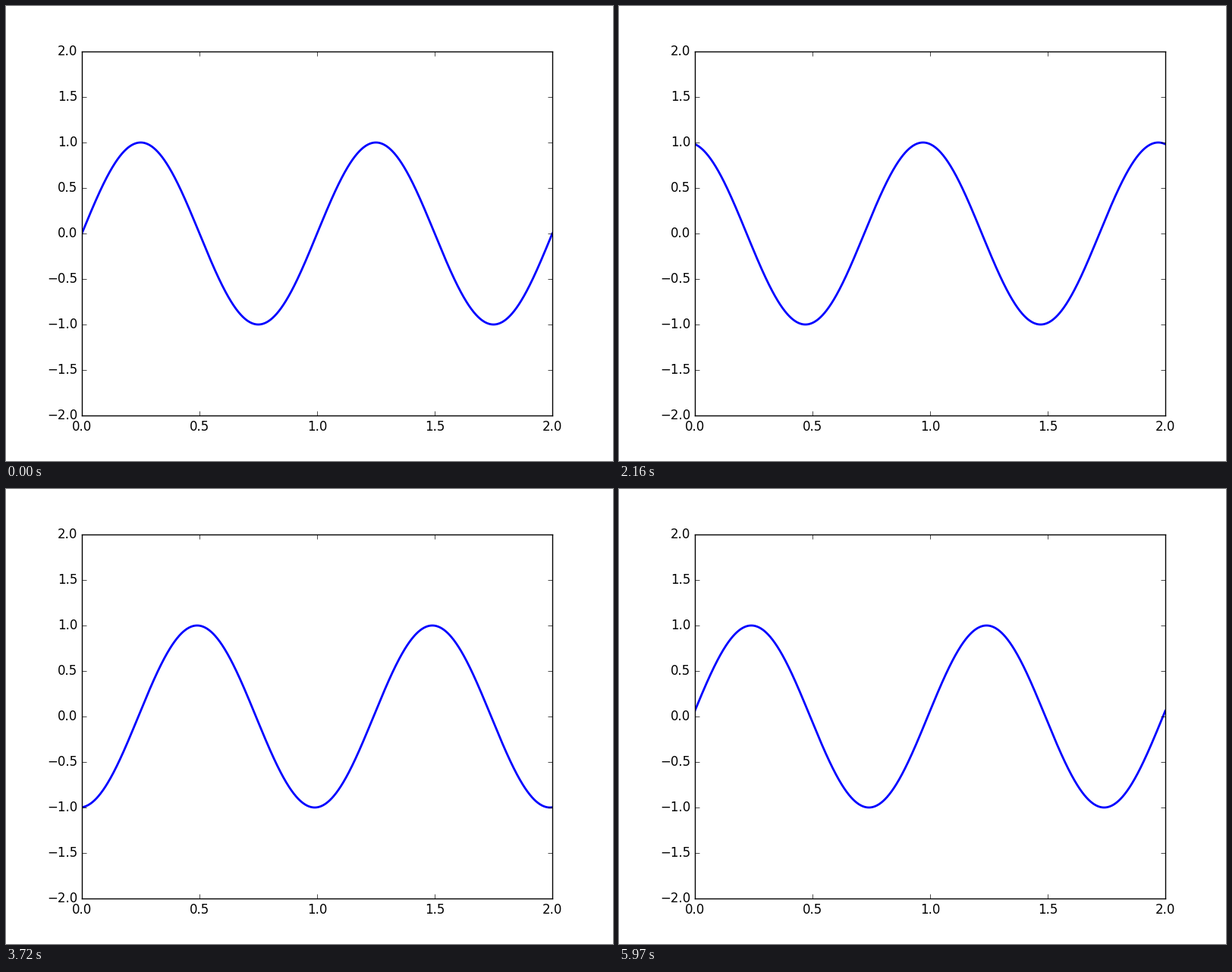
These frames come from a looping animation (800x600 px, 6000 ms). A matplotlib script:

```python
import matplotlib.pyplot as plt
import numpy as np
from matplotlib.animation import FuncAnimation

FRAMES = 200
INTERVAL = 30  # ms
SHIFT = 0.01   # wave travel per frame, in x units

plt.style.use("classic")
plt.rcParams["font.family"] = "DejaVu Sans"

fig = plt.figure(figsize=(8, 6), dpi=100, facecolor="white")
ax = fig.add_axes([0.125, 0.1, 0.775, 0.8], xlim=(0, 2), ylim=(-2, 2))
ax.set_xticks(np.arange(0, 2.1, 0.5))
ax.set_yticks(np.arange(-2, 2.1, 0.5))

x = np.linspace(0, 2, 1000)
line, = ax.plot([], [], color="blue", lw=2)


def update(i):
    line.set_data(x, np.sin(2 * np.pi * (x - SHIFT * i)))
    return line,


anim = FuncAnimation(fig, update, frames=FRAMES, interval=INTERVAL,
                     repeat=True, repeat_delay=0, blit=False)
plt.show()
```
